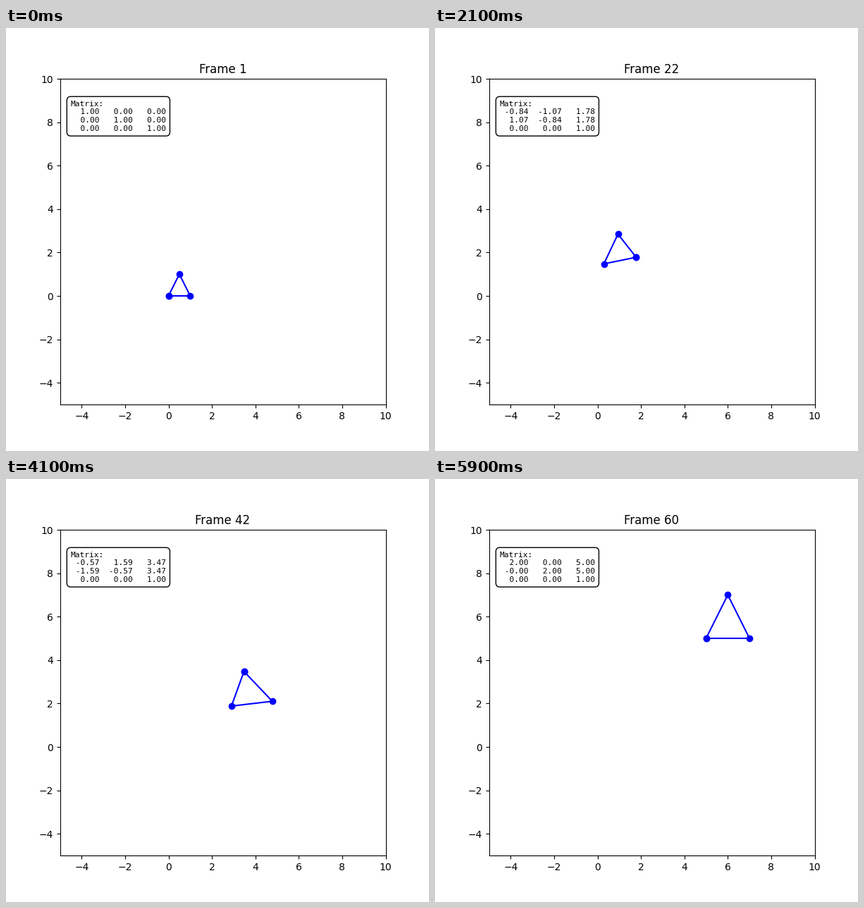
Animation, 600 px wide and 600 px high, one loop 6 s. Source, as a matplotlib script:

```python
import numpy as np
import matplotlib.pyplot as plt
from matplotlib.animation import FuncAnimation

FRAMES = 60
INTERVAL = 100  # ms
SHIFT = 5
END_SCALE = 2

# Closed triangle in homogeneous coordinates
TRIANGLE = np.array([
    [0, 1, 0.5, 0],
    [0, 0, 1, 0],
    [1, 1, 1, 1],
])


def transform(t):
    """Scale, then rotate, then translate; t runs from 0 to 1."""
    angle = 2 * np.pi * t
    scale = 1 + (END_SCALE - 1) * t
    c, s = np.cos(angle), np.sin(angle)
    translation = np.array([[1, 0, SHIFT * t], [0, 1, SHIFT * t], [0, 0, 1]])
    rotation = np.array([[c, -s, 0], [s, c, 0], [0, 0, 1]])
    scaling = np.diag([scale, scale, 1])
    return translation @ rotation @ scaling + 0.0  # turns -0.0 into 0.0


def matrix_text(matrix):
    rows = [" ".join(f"{value:6.2f}" for value in row) for row in matrix]
    return "\n".join(["Matrix:", *rows])


fig, ax = plt.subplots(figsize=(6, 6), dpi=100)
ax.set_xlim(-5, 10)
ax.set_ylim(-5, 10)
ax.set_aspect("equal")

shape, = ax.plot([], [], "o-", color="blue")
title = ax.set_title("")
label = ax.text(
    -4.5, 9, "", fontsize=8, family="DejaVu Sans Mono", va="top",
    bbox=dict(boxstyle="round,pad=0.5", facecolor="white", edgecolor="black"),
)


def update(i):
    matrix = transform(i / (FRAMES - 1))
    x, y, _ = matrix @ TRIANGLE
    shape.set_data(x, y)
    label.set_text(matrix_text(matrix))
    title.set_text(f"Frame {i + 1}")
    return shape, label, title


anim = FuncAnimation(fig, update, frames=FRAMES, interval=INTERVAL,
                     repeat=True, repeat_delay=0, blit=False)

plt.show()
```
